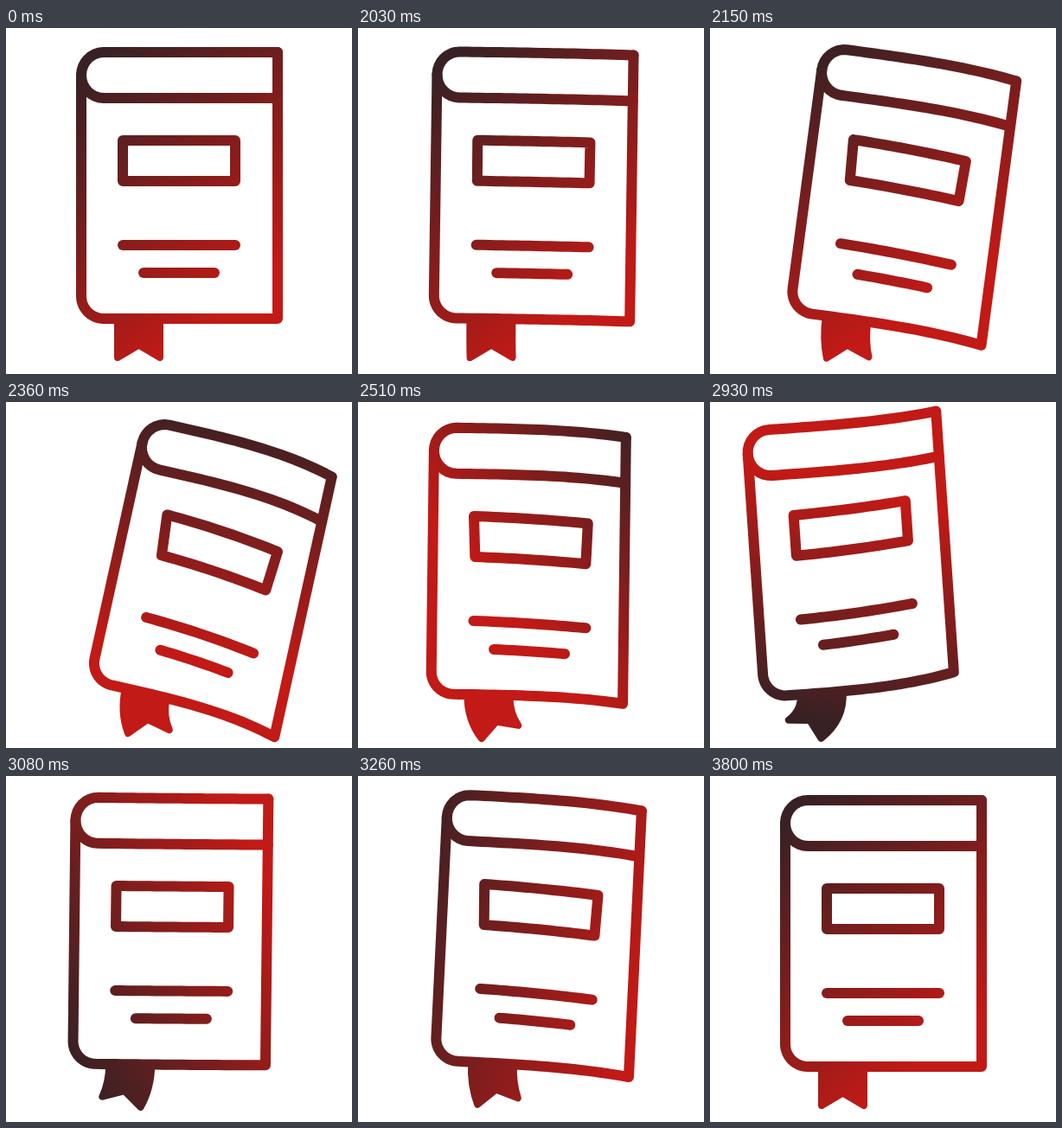
An HTML page with a canvas that plays this animation: 400 by 400 pixels, repeating every 3830 ms.

```html
<!DOCTYPE html>
<html lang="en">
<head>
<meta charset="utf-8">
<title>Swinging book</title>
<style>
  html, body { margin: 0; width: 100%; height: 100%; overflow: hidden; background: #fff; }
  canvas { display: block; width: 100vmin; height: 100vmin; }
</style>
</head>
<body>
<canvas id="stage" width="400" height="400"></canvas>
<script>
const ctx = document.getElementById('stage').getContext('2d');
const LOOP = 3830, START = 2030, STEP = 30;
const W = 227, H = 308, RAD = 26, SPINE = 53;
const DARK = '#382124', RED = '#c21a16';
const rad = deg => deg * Math.PI / 180;
const clamp = x => Math.min(1, Math.max(0, x));
const ease = x => (1 - Math.cos(Math.PI * clamp(x))) / 2;

// The book tips first; its bend follows a little later
const TIP = [1980, 2300, 2680, 3240, 3620];
const FOLLOW = [1980, 2310, 2850, 3260, 3620];
const DANGLE = [1980, 2300, 2650, 2950, 3260, 3620];

// Eased swing from one turning point to the next
function swing(t, times, ...turns) {
  let v = turns[0];
  for (let i = 1; i < times.length; i++)
    v += (turns[i] - turns[i - 1]) * ease((t - times[i - 1]) / (times[i] - times[i - 1]));
  return v;
}

function poseAt(t) {
  if (t < START) t = 0;
  return {
    tilt: rad(swing(t, TIP, 0, 13.8, -8.7, 2.8, 0)),
    x: swing(t, FOLLOW, 200, 208, 173, 202, 200),
    y: swing(t, TIP, 336, 347, 333, 334, 336),
    bend: swing(t, FOLLOW, 0, 20, -15, 9, 0),
    inset: swing(t, FOLLOW, 0, 4.5, 7, 2.5, 0),
    dangle: swing(t, DANGLE, 0, 2, 19, -20, 6, 0)
  };
}

// Places a point of the flat cover on the tilted, bent book
function makeMap({ tilt, x: px, y: py, bend }) {
  const c = Math.cos(tilt), s = Math.sin(tilt);
  return (u, v, inner) => {
    let lift = bend * Math.pow(Math.max(0, u) / W, inner ? 2 : 3.5);
    if (bend < 0) lift *= 0.7 + 0.5 * v / H;
    if (inner) lift = lift * 1.25 - 0.06 * Math.abs(bend);
    const x = u - 113, y = v - H + lift;
    return [px + x * c - y * s, py + x * s + y * c];
  };
}

function arc(cx, cy, rx, ry, from, to) {
  return Array.from({ length: 17 }, (_, k) => {
    const a = rad(from + (to - from) * k / 16);
    return [cx + rx * Math.cos(a), cy + ry * Math.sin(a)];
  });
}

// Strokes a path, split into short pieces so that it can bend
function line(map, pts, inner) {
  ctx.beginPath();
  ctx.moveTo(...map(...pts[0], inner));
  for (let i = 1; i < pts.length; i++) {
    const [x0, y0] = pts[i - 1], [x1, y1] = pts[i];
    const n = Math.ceil(Math.hypot(x1 - x0, y1 - y0) / 8);
    for (let k = 1; k <= n; k++)
      ctx.lineTo(...map(x0 + (x1 - x0) * k / n, y0 + (y1 - y0) * k / n, inner));
  }
  ctx.stroke();
}

// The hem hangs below the cover, shifts sideways and turns as it dangles
function drawRibbon(map, { tilt, dangle }) {
  const [ax, ay] = map(42, H), [bx, by] = map(91, H);
  const away = Math.abs(dangle), turn = rad(-1.5 * dangle);
  const mx = (ax + bx) / 2 + dangle, my = (ay + by) / 2 + 45 - 0.15 * away;
  const c = Math.cos(turn), s = Math.sin(turn);
  const half = 24.5 - 0.15 * away, notch = 14.5 - 0.14 * away;
  const side = (x, y, ex, ey, tx, ty) => {
    const d = 0.55 * Math.hypot(tx - x, ty - y);
    ctx.quadraticCurveTo(x - Math.sin(tilt) * d, y + Math.cos(tilt) * d, ex, ey);
  };
  const lx = mx - c * half, ly = my - s * half;
  const rx = mx + c * half, ry = my + s * half;
  ctx.beginPath();
  ctx.moveTo(ax, ay);
  side(ax, ay, lx, ly, lx, ly);
  ctx.lineTo(mx + s * notch, my - c * notch);
  ctx.lineTo(rx, ry);
  side(bx, by, bx, by, rx, ry);
  ctx.closePath();
  ctx.lineWidth = 8;
  ctx.fill();
  ctx.stroke();
}

// The colour turns once around, leaning to red halfway
function makePaint(t) {
  const p = clamp((t - 2050) / 1450);
  const dir = rad(50 + 360 * (0.25 * p + 0.75 * ease(p)));
  const lean = Math.sin(Math.PI * clamp((t - 2000) / 1400)) ** 4;
  const shift = -14 - 85 * lean, half = 157 - 42 * lean;
  const at = d => [200 + Math.cos(dir) * d, 183 + Math.sin(dir) * d];
  const paint = ctx.createLinearGradient(...at(shift - half), ...at(shift + half));
  paint.addColorStop(0, DARK);
  paint.addColorStop(1, RED);
  return paint;
}

function draw(t) {
  const pose = poseAt(t), map = makeMap(pose);
  ctx.fillStyle = '#fff';
  ctx.fillRect(0, 0, 400, 400);
  ctx.fillStyle = ctx.strokeStyle = makePaint(t);
  ctx.lineCap = ctx.lineJoin = 'round';

  drawRibbon(map, pose);

  ctx.lineWidth = 12;
  const right = W - pose.inset, mid = SPINE / 2;
  line(map, [[right, 0], ...arc(RAD, mid, RAD, mid, 270, 90), [right, SPINE]]);
  line(map, [[0, mid], ...arc(RAD, H - RAD, RAD, RAD, 180, 90), [right, H], [right, 0]]);

  // The label fans out a little with the bend
  const fan = Math.max(0, pose.bend) * 0.1;
  line(map, [[48 - fan, 102], [178 + fan, 102], [178 - fan, 149], [48 + fan, 149], [48 - fan, 102]], true);
  line(map, [[48, 223], [178, 223]], true);
  line(map, [[72, 255], [154, 255]], true);
}

function frame(now) {
  const t = now % LOOP;
  draw(t < START ? 0 : START + Math.floor((t - START) / STEP) * STEP);
  requestAnimationFrame(frame);
}
draw(0);
requestAnimationFrame(frame);
</script>
</body>
</html>
```
